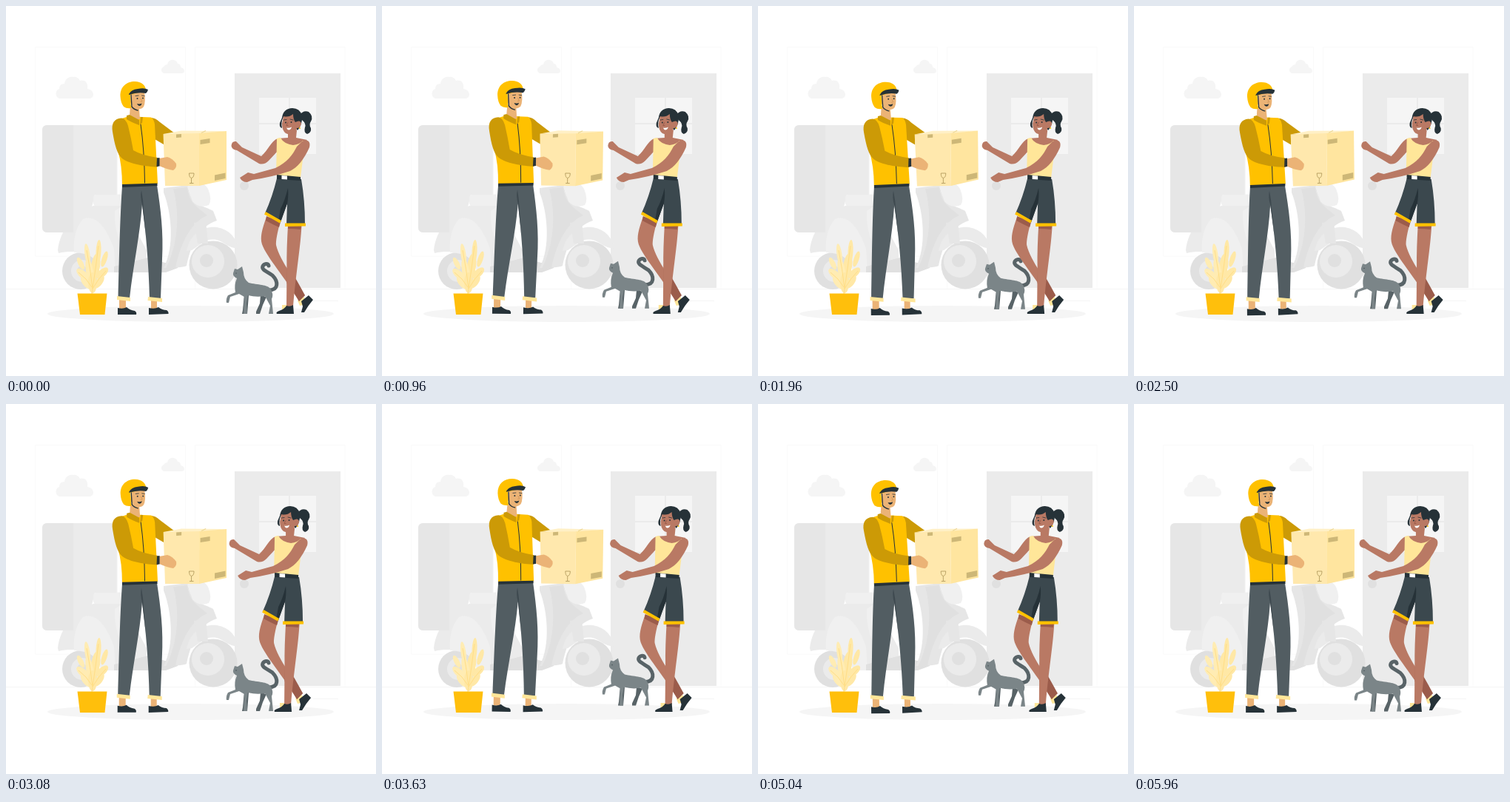
Animation of 500 by 500 pixels, one loop 6000 ms. Source, as an HTML page:

```html
<!DOCTYPE html>
<html lang="en">
<head>
<meta charset="utf-8">
<title>Parcel delivery</title>
<style>
html, body { margin: 0; width: 100%; height: 100%; overflow: hidden; background: #fff; }
svg { display: block; width: 100%; height: 100%; }
.gold { fill: #ffc100; } .ochre { fill: #cc9a06; } .cream { fill: #ffe699; }
.ink { fill: #263238; } .tan { fill: #ebb376; } .brown { fill: #b97964; } .shade { fill: #9b5c4b; }
.g1 { fill: #e0e0e0; } .g2 { fill: #e6e6e6; } .g3 { fill: #ebebeb; } .g4 { fill: #f0f0f0; } .g5 { fill: #f5f5f5; }
.line { fill: none; stroke: #263238; stroke-linecap: round; }
</style>
</head>
<body>
<svg viewBox="0 0 500 500">
  <!-- room -->
  <path d="M39.500 338V55.500H242.500V338zM255.500 382V55.500H458V382" fill="none" stroke="#fafafa"/>
  <path d="M0 382.500H500M415 398.500H449" stroke="#f5f5f5"/>
  <path class="g5" d="M72 125C66 123 66 114 72 112Q72 105 79 105C80 97 87 95 91 96C96 95 99 99 100 101C107 99 111 104 110 112Q117 113 118 119Q118 125 112 125zM213 91C209 89 209 84 213 82Q215 79 218 79C219 74 223 72 227 73Q231 74 232 78Q236 78 236 83Q241 84 241 88Q241 91 237 91z"/>
  <path class="g3" d="M309 91H452V381H309z"/>
  <path class="g5" d="M342 124H382V158H342zM384 124H419V158H384zM342 160H382V200H342zM384 160H419V200H384z"/>
  <circle class="g1" cx="322" cy="243" r="6"/>
  <ellipse class="g5" cx="249.500" cy="416" rx="193.500" ry="11"/>

  <!-- scooter -->
  <circle class="g1" cx="101" cy="358" r="25"/><circle class="g3" cx="103" cy="358" r="15"/><circle class="g1" cx="103" cy="358" r="7"/>
  <path class="g3" d="M70 330C73 302 94 275 125 268H157L190 330V359H132C126 336 98 328 71 334z"/>
  <path class="g3" d="M49 168Q49 161 56 161H150V255H120Q116 280 98 306H56Q49 306 49 299z"/>
  <path class="g2" d="M56 161H91V306H56Q49 306 49 299V168Q49 161 56 161z"/>
  <path d="M150 187H157V255H150z" fill="#fff" stroke="#f0f0f0"/>
  <rect class="g4" x="118" y="255" width="60" height="15" rx="4"/>
  <path class="g4" d="M104 288C122 281 136 300 146 328L148 360H128C127 342 112 334 92 333Q90 304 104 288z"/>
  <path class="g4" d="M147 277L157 270V325Q146 305 147 277z"/>
  <path class="g1" d="M146 352L192 340L215 347L232 350V354L216 360H146z"/>
  <path class="g2" d="M213 246L246 242C248 270 269 270 280 277L285 290C259 298 249 327 244 351Q239 354 213 354C228 326 224 280 213 252z"/>
  <path class="g1" d="M226 247L245 245C247 268 262 274 272 283C247 293 234 328 229 354L216 355C233 322 235 280 226 247z"/>
  <path class="g4" d="M245 244Q264 232 273 247Q279 262 274 269Q260 274 252 264z"/>
  <circle class="g1" cx="280" cy="350" r="32.500"/>
  <path class="g3" d="M244 331C249 306 268 297 285 299C302 302 311 313 314 328C291 325 293 311 270 317L251 330z"/>
  <circle class="g3" cx="273" cy="345" r="22"/><circle class="g1" cx="271" cy="344" r="9"/>
  <path class="g2" d="M254 293L270 291L273 321L259 321z"/>

  <!-- potted plant -->
  <g id="leaves"></g>
  <path d="M116 389Q121 356 125 324M117 382Q114 355 109 330M117 382Q125 368 135 358M116 380Q109 368 98 360" fill="none" stroke="#ffde86"/>
  <path fill="#ffbf0c" d="M96.500 388.500H136.500L133.500 417H100z"/>

  <g id="man">
    <path class="ochre" d="M196 151Q202 151 208 157L228 172L213 174V187L201 180z"/>
    <path class="tan" d="M153 396H162V409H153zM196 396H204V409H196z"/>
    <path class="ink" d="M151 408Q158 410 163 407Q167 411 174 412Q177 414 176 417H151zM193 408Q201 410 206 407Q211 411 217 411Q220 413 219.500 416L193 417z"/>
    <path fill="#525d62" d="M157 244L204 242C209 275 213 305 211 342L209 395H194C193 350 189 305 184 268C181 310 172 350 167 395H151.500C153 340 154 285 157 244z"/>
    <path fill="#3e494f" d="M183 249Q181 258 184 268L189 310L185 262z"/>
    <path class="cream" d="M150 392L168 394V399L150 397zM192 393L211 395V400L191.500 398z"/>
    <path class="gold" d="M150 154Q160 151 166 149L184 150L196 150.500Q200 153 201 160L205 240L157 243Q157 215 151 195z"/>
    <path class="ink" d="M157 241L204.500 239.500V243L157 245z"/>
    <path class="tan" d="M168 134L180 139L181 153Q172 155 167 147z"/>
    <path class="ochre" d="M163 148L167 147L180 154L180 161Q169 157 163 153zM181 160L182 150L185 150L184 158z"/>
    <path class="line" d="M182 160Q187 195 187.500 239"/>
    <path class="ochre" d="M156 151.500C146 152 142 159 144 170C147 188 150 200 157 206C167 214 190 217 205 217.500V205Q184 202 172 195Q169 178 165 162Q162 152 156 151.500z"/>
    <path class="tan" d="M169 117L187 116Q189 130 186 136Q183 140 177 139Q170 137 168 130z"/>
    <path class="gold" d="M154.500 122C154 109 163 102 174 102C183 102 189 107 189 114L168 120L169 138Q163 139 159 136Q155 131 154.500 122z"/>
    <path class="ink" d="M166 119Q169 113 178 112Q187 110 192 113Q191 117 189 118Q178 116 166 120z"/>
    <path class="line" d="M169 120L170 136Q173 140 178 141" stroke-width="1.300"/>
    <circle class="ink" cx="177.500" cy="125" r="1"/><circle class="ink" cx="185" cy="124.500" r="1"/>
    <path class="line" d="M175 121.500L179 121M183.500 121L187 121.500" stroke-width=".8"/>
    <path class="ink" d="M177 132Q180 133 183.500 131.500Q183 135 180 135Q178 134.500 177 132z"/>
    <path d="M182 125L184 129L181.500 129.500" fill="none" stroke="#cb8d52" stroke-width=".7"/>
    <!-- parcel -->
    <path fill="#fff0c6" d="M212.500 173L237 168.500L298 169L261 173z"/>
    <path fill="#ffe8ad" d="M212.500 173L261 172V243L215 243z"/>
    <path fill="#ffe59f" d="M261 172L298 169V235L261 243z"/>
    <path fill="#cdb777" d="M230 173.500L237 173V177.500L230 178zM262.500 181L275.500 179V185L262.500 187zM282 228.500L296.500 225.500V233L282 236z"/>
    <path d="M247.500 226H254Q254 232 250.500 232.500Q247.500 232 247.500 226M250.500 233V239M248 239.500H253.500" fill="none" stroke="#b39c5e" stroke-width=".9"/>
    <path d="M264 171.500L270 168.500" stroke="#ecd592"/>
    <path class="tan" d="M207 206L218 204Q225 206 230 213Q231 219 226 222Q218 221 207 216z"/>
    <path class="ink" d="M204 205.500L207.500 205V216.500L203.500 217z"/>
  </g>

  <g id="cat">
    <path fill="#586367" d="M322 389L320 411L319 416H326L328 391zM344 391L343 402L338 413V416H343L347 404L352 393z"/>
    <path d="M355 384C369 384 368 372 360 364C351 358 345 356 347 351.500C349 348 354 347.500 355 351" fill="none" stroke="#586367" stroke-width="5" stroke-linecap="round"/>
    <path fill="#7b8588" d="M307 361L309 355L313 356L319 352L321 360Q321 369 328 374C340 377 354 376 358 383Q362 390 359 396L361 416H355L357 405L350 392Q338 394 327 391L325 402L326 416H321L322 393L315 389L303 393L301 401H298Q297 396 300 391L310 387Q308 377 312 368Q306 365 307 361z"/>
    <circle class="ink" cx="311" cy="361" r=".6"/>
  </g>

  <g id="woman">
    <path class="brown" d="M367 179C358 183 354 195 345 203L319 191L311 183Q305 182 304.500 189Q305 194 312 195L342 213Q349 215 355 209L369 194z"/>
    <path class="ink" d="M396 148Q402 140 409 143Q416 149 412 156Q409 160 412 165Q413 171 407 173Q402 171 404 164Q406 159 400 154z"/>
    <path class="cream" d="M394 398L403 393L405 403L397 405zM373 404H388V410H373z"/>
    <path class="brown" d="M352 285C346 302 343 312 346 322C352 339 378 368 396 399L404 391C394 374 370 345 365 323Q364 316 371 290z"/>
    <path class="shade" d="M380 349L379.500 375Q390 388 396 399L404 391Q394 372 380 349zM352 284L371 292L369 299Q360 295 351 290z"/>
    <path class="ink" d="M399 399L409 391L415 397Q408 405 403 414L399 414L401 406z"/>
    <path class="brown" d="M381 297H399.500C398 325 392 360 388 406H379L379.500 355C379 335 380 315 381 297z"/>
    <path class="shade" d="M381 297H399L398 302Q390 301 381 301z"/>
    <path class="ink" d="M379 405Q384 407 388 404L389 416H366Q364 414 369 412Q376 410 379 405z"/>
    <path fill="#3b484e" d="M366 233L399 234Q404 263 404 294.500L379 295.500L380 267L371 292L350 280Q360 258 366 233z"/>
    <path class="ink" d="M380 267Q382 258 381 246Q377 263 371 274L368 291L371 292z"/>
    <path class="gold" d="M351 278L372 290L370 293.500L349 281.500zM377 293.500H405V297.500L377 298z"/>
    <path class="brown" d="M381 168H393L392 178L407 181L396 194L367 186L367 179L381 178z"/>
    <path class="cream" d="M366 179L371 178Q375 186 388 188Q397 187 401 182L404 183L398 232L365 229z"/>
    <path class="ink" d="M366 228L398 231V236L366 234z"/>
    <path fill="#fff" d="M372.500 229L380 229.500V234.500L372.500 234z"/>
    <path class="brown" d="M400 183C408 179 412 184 410 191C403 207 394 218 384 223Q360 231 333 235L326 238Q319 238 316 232L327 225L335 227L364 219C380 211 387 202 393 190z"/>
    <path class="ink" d="M373 151C374 143 379 138 387 138Q397 138 400 148Q401 160 394 168L384 155L375 150Q371 157 373 165Q369 164 370 158z"/>
    <path class="brown" d="M375 149Q382 151 388 146Q388 153 391 157Q398 153 399 159Q398 165 393 165L392 171Q384 175 378 172Q373 168 373 159z"/>
    <circle class="ink" cx="378" cy="157.500" r="1"/><circle class="ink" cx="385.500" cy="157" r="1"/>
    <path class="line" d="M375.500 154L379 153.500M384 153L388 154" stroke-width=".8"/>
    <path d="M381 157L379 161.500H381.500" fill="none" stroke="#8f5040" stroke-width=".7"/>
    <path fill="#fff" d="M379 164.500Q382.500 165.500 386 163.500Q385 167.500 382 167.500Q380 167 379 164.500z"/>
    <circle class="gold" cx="397" cy="165" r="1"/>
  </g>
</svg>
<script>
const $ = id => document.getElementById(id);

// x, y, half width, half length, tilt
const leaves = [
  [125, 332, 3.5, 16, 3], [110, 336, 3.5, 15, -8], [133, 342, 3.5, 11, 18], [101, 348, 3.5, 9, -28],
  [130, 361, 5, 10, 48], [104, 363, 5, 11, -48], [126, 373, 4.5, 10, 35], [108, 374, 4.5, 10, -38],
  [121, 352, 6, 18, 8], [113, 358, 5, 17, -10], [117, 374, 6, 14, 0]
];
$('leaves').innerHTML = leaves.map(([x, y, w, h, tilt], i) =>
  `<ellipse cx="${x}" cy="${y}" rx="${w}" ry="${h}" fill="${i % 2 ? '#ffecb3' : '#ffe8a6'}" transform="rotate(${tilt} ${x} ${y})"/>`).join('');

// Linear interpolation through [progress, value] keys, repeated every period.
function track(keys, period, t) {
  const p = t % period / period;
  const i = Math.max(1, keys.findIndex(k => k[0] >= p));
  const [p0, v0] = keys[i - 1], [p1, v1] = keys[i];
  return v0 + (v1 - v0) * (p - p0) / (p1 - p0);
}

const sway = [[0, 0], [.25, 1], [.75, -1], [1, 0]];
const hover = [[0, 0], [.5, -10], [1, 0]];
const shake = [0, -1, 2, -4, 4, -4, 4, -4, 2, -1, 0].map((x, i) => [i / 10, x]);
const start = performance.now();

function draw() {
  const t = performance.now() - start;
  $('man').setAttribute('transform', `rotate(${track(sway, 3000, t)} 250 250)`);
  $('cat').setAttribute('transform', `translate(0 ${track(hover, 1500, t)})`);
  $('woman').setAttribute('transform', `translate(${track(shake, 6000, t)} 0)`);
  requestAnimationFrame(draw);
}
draw();
</script>
</body>
</html>
```
